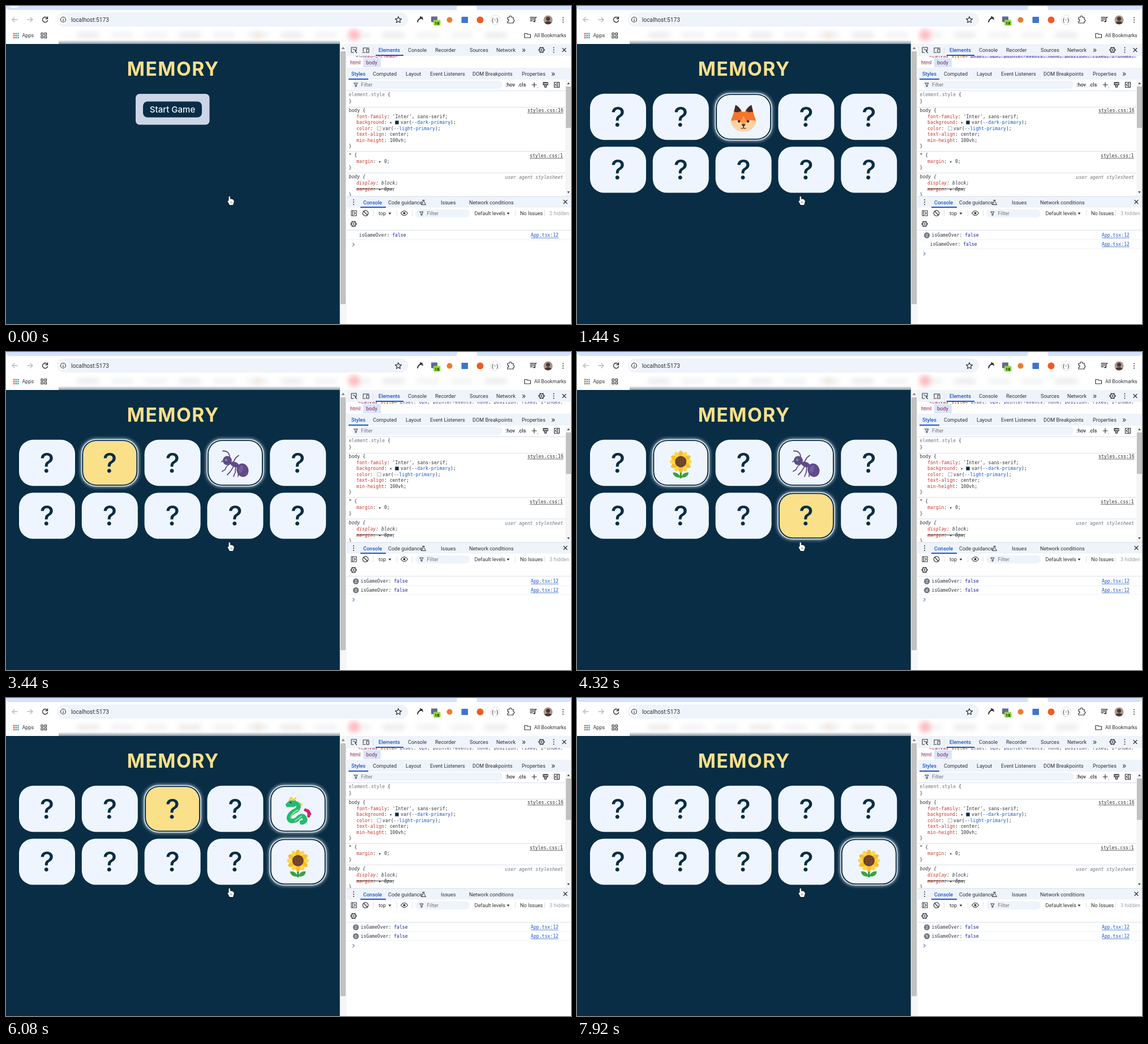
Write an HTML page with a canvas that moves like this. It is 998x561 px and loops after 8 s.

```html
<!DOCTYPE html>
<html lang="en">
<head>
<meta charset="utf-8">
<title>Memory game</title>
<style>
html, body { margin: 0; width: 100%; height: 100%; overflow: hidden; background: #fff; }
canvas { display: block; }
</style>
</head>
<body>
<canvas id="stage" width="998" height="561"></canvas>
<script>
const ctx = document.getElementById('stage').getContext('2d');
const LOOP = 8000, STEP = 80, START = 800;
const NAVY = '#082d45', CARD = '#eff5fe', YELLOW = '#fbe08a', TEAL = '#3fa59f';
const INK = '#303338', GREY = '#70757a', BLUE = '#1b57c8', RED = '#c8352b', LINE = '#d8e0ec', BAR = '#eff3fa';
const UI = '9.1px Roboto, sans-serif', UI_BOLD = '500 9.1px Roboto, sans-serif';
const MONO = '8.15px "DejaVu Sans Mono", monospace';

// [time, card]: cards are numbered 0-9, left to right, top to bottom
const clicks = [[1200, 2], [2000, 6], [2960, 3], [3760, 1], [4720, 9], [5360, 4], [6240, 2], [6800, 1], [7680, 9]];
const hovers = [[1040, 2], [1760, 6], [2640, 7], [2720, 8], [2800, 3], [3360, 1], [4160, 6], [4240, 7], [4320, 8],
  [4400, 9], [5120, 4], [5840, 3], [6000, 2], [6640, 1], [7440, 8], [7520, 9]];
const faces = { 1: sunflower, 2: fox, 3: ant, 4: dragon, 6: dragon, 9: sunflower };

function rect(x, y, w, h, color, radius = 0) {
  ctx.fillStyle = color;
  ctx.beginPath();
  ctx.roundRect(x, y, w, h, radius);
  ctx.fill();
}
function ellipse(x, y, rx, ry, color, angle = 0) {
  ctx.fillStyle = color;
  ctx.beginPath();
  ctx.ellipse(x, y, rx, ry, angle, 0, 7);
  ctx.fill();
}
const dot = (x, y, r, color) => ellipse(x, y, r, r, color);
function fill(d, color) {
  ctx.fillStyle = color;
  ctx.fill(new Path2D(d));
}
function stroke(d, color = INK, width = 1.2) {
  ctx.strokeStyle = color;
  ctx.lineWidth = width;
  ctx.lineCap = ctx.lineJoin = 'round';
  ctx.stroke(new Path2D(d));
}
function at(x, y, draw) {
  ctx.save();
  ctx.translate(x, y);
  draw();
  ctx.restore();
}
function text(str, x, y, color = INK, font = UI) {
  ctx.font = font;
  ctx.fillStyle = color;
  ctx.fillText(str, x, y);
  return x + ctx.measureText(str).width;
}
// alternating strings and colours on one monospaced line
function code(x, y, parts, font = MONO) {
  for (let i = 0; i < parts.length; i += 2) x = text(parts[i], x, y, parts[i + 1], font);
}
const menuDots = (x, y) => [-4, 0, 4].forEach(d => dot(x, y + d, 1, INK));
const cross = (x, y) => stroke(`M${x - 3} ${y - 3}l6 6m0-6l-6 6`);
const funnel = (x, y) => stroke(`M${x - 3} ${y - 3}h6l-2 3v3h-2v-3z`, INK, 1);
const caret = (x, y) => fill(`M${x - 2.5} ${y - 1.5}h5l-2.5 3.5z`, INK);
const ring = (x, y, r, color = INK, w = 1.2) => stroke(`M${x - r} ${y}a${r} ${r} 0 1 0 ${2 * r} 0a${r} ${r} 0 1 0 ${-2 * r} 0`, color, w);
function gear(x, y) {
  ring(x, y, 4, INK, 1.6);
  ring(x, y, 1.3, INK, 1);
  for (let a = 0; a < 6; a++) dot(x + 5 * Math.cos(a * Math.PI / 3), y + 5 * Math.sin(a * Math.PI / 3), .9, INK);
}

function fox() {
  fill('M-18-8L-14-24Q-4-18-3-12H3Q4-18 14-24L18-8L22 3Q18 12 0 16Q-18 12-22 3Z', '#f4752b');
  fill('M-17-12L-14-24Q-7-20-4-13L-10-11ZM17-12L14-24Q7-20 4-13L10-11Z', '#3a2b35');
  fill('M-23 5Q-12 0-5 6L0 11L5 6Q12 0 23 5Q18 23 0 23Q-18 23-23 5Z', '#fdd3a0');
  fill('M-5 5L0-5L5 5L0 12Z', '#ffa04d');
  dot(-8, 5, 2.2, '#33262e');
  dot(8, 5, 2.2, '#33262e');
  fill('M-4 10H4L0 15Z', '#33262e');
  stroke('M-4 17Q-1 19 0 15Q1 19 4 17', '#33262e', 1.1);
}
function dragon() {
  stroke('M13-1Q21 1 19 10M18 1L21 6', '#d51e78', 5);
  stroke('M-12-12L-2-12Q4-8-2-1Q-16 5-16 14Q-13 22-2 16Q6 6 11 12Q16 19 7 21', '#28b971', 8);
  fill('M-22-11L-15-18H-4L0-10L-8-6H-20Z', '#28b971');
  stroke('M0-1Q-12 5-13 13M-5 18Q2 14 6 10', '#8ce58d', 2);
  stroke('M-15-18L-12-23L-8-18L-4-22M4-13L7-10', '#ffc72f', 2.5);
  dot(-13, -14, 1.2, '#173a35');
}
function ant() {
  const c = '#604a89';
  stroke('M-22-24Q-9-24-10-11M-20-7L-24-5M-5-3Q-15 0-18 9L-23 12M-2 2L-9 13L-14 18M1 3L0 14L-3 21M3 2L6 12L5 21M-4-3L1-12L6-16', c, 1.8);
  ellipse(-14, -7, 8, 8, c, .5);
  ellipse(-1, 0, 8, 4.5, c, .35);
  ellipse(13, 10, 10.5, 12, c, -.3);
  ellipse(10, 8, 4, 7, '#735e9d', .3);
  dot(-16, -8, 2.2, '#56a87d');
}
function sunflower() {
  stroke('M0 8V23', '#27973d', 3);
  fill('M0 23Q-4 13-14 14Q-13 24 0 23Q13 24 14 14Q4 13 0 23Z', '#38a341');
  for (let i = 0; i < 12; i++) {
    const a = i * Math.PI / 6;
    ellipse(13 * Math.cos(a), -5 + 13 * Math.sin(a), 6.5, 4, i % 2 ? '#f8bf28' : '#ffd646', a);
  }
  dot(0, -5, 10, '#6d4229');
  for (let i = 0; i < 9; i++) dot(-4 + 4 * (i % 3), -9 + 4 * Math.floor(i / 3), 1, '#8e5a37');
}

const cardX = i => 23 + 110.8 * (i % 5), cardY = i => i < 5 ? 154.8 : 248.2;

function drawCard(i, selected, hovered, scale) {
  at(cardX(i) + 49.5, cardY(i) + 40.7, () => {
    ctx.scale(scale, 1);
    const lit = selected || hovered, color = hovered && !selected ? YELLOW : CARD;
    if (lit) {
      ctx.shadowColor = 'rgba(255,255,255,.9)';
      ctx.shadowBlur = 6;
      rect(-50.5, -41.7, 101, 83.4, '#dce6ef', 26);
      ctx.shadowBlur = 0;
      rect(-49, -40.2, 98, 80.4, NAVY, 25);
      rect(-47, -38.4, 94, 76.8, color, 23);
    } else rect(-49.5, -40.7, 99, 81.4, color, 25);
    if (selected) {
      ctx.translate(0, 3);
      faces[i]();
    } else {
      ctx.textAlign = 'center';
      text('?', 0, 17.5, NAVY, '500 48px Inter, sans-serif');
    }
  });
}

function drawOutlines(alpha) {
  ctx.globalAlpha = alpha;
  ctx.strokeStyle = TEAL;
  ctx.lineWidth = 1;
  ctx.strokeRect(22.5, 154.5, 542.5, 174.5);
  for (let i = 0; i < 10; i++) {
    const x = cardX(i), y = cardY(i), first = i === 0;
    ctx.strokeRect(x, y, 99, 81.4);
    rect(x - .5, y - 10.3, first ? 97 : 48, 10, TEAL);
    text(first ? 'MemoryCard, EmojiButton' : 'EmojiButton', x + 1, y - 3.2, '#0b3c47', '6.8px "DejaVu Sans Mono", monospace');
  }
  ctx.globalAlpha = 1;
}

function drawGame(t) {
  rect(0, 67, 589.5, 494, NAVY);
  ctx.letterSpacing = '1.5px';
  text('MEMORY', 213.7, 123.3, YELLOW, '700 33.5px Inter, sans-serif');
  ctx.letterSpacing = '0px';
  if (t < START) {
    rect(229, 155, 130.5, 54.5, '#ccd5e6', 7);
    rect(242, 168.5, 104, 28, NAVY, 8);
    ctx.textAlign = 'center';
    text('Start Game', 294, 188, '#f3f7fc', '500 15px Inter, sans-serif');
    ctx.textAlign = 'left';
  } else {
    const done = clicks.filter(c => c[0] <= t), n = done.length;
    const picked = done.slice(n - (n % 2 || 2)).map(c => c[1]);
    const last = n ? done[n - 1] : [START, -1];
    const turning = n % 2 && n > 1 ? [last[1], ...done.slice(n - 3, n - 1).map(c => c[1])] : [last[1]];
    const rest = 1 - Math.min(1, (t - last[0] + 72) / 300);
    const turn = Math.abs(Math.cos(Math.PI * (1 - rest * rest)));
    const hover = hovers.filter(h => h[0] <= t).pop();
    for (let i = 0; i < 10; i++)
      drawCard(i, n > 0 && picked.includes(i), hover && hover[1] === i, turning.includes(i) ? turn : 1);
    const fade = 1 - (t - last[0]) / 240;
    if (fade > 0) drawOutlines(fade);
  }
  at(397, 343, () => {
    const hand = 'M-3.5-6.5Q-2-8-1-6.5V-2Q1-3.5 2-1.7Q4-2.5 4.5-.5Q6-.5 5.7 2L4 8H-2L-5.5 1.5Q-5.5 0-3.5 1Z';
    stroke(hand, '#14202b', 1.6);
    fill(hand, '#fff');
    stroke('M-.2 2V5M2 2V5', '#566', .7);
  });
}

function drawBrowser(t) {
  rect(0, 0, 998, 67, '#fff');
  rect(0, 0, 998, 7, '#d3e3fd', [0, 0, 6, 6]);
  rect(796, 0, 36, 8, '#fff', 5);
  if (t < 640) ellipse(14, 0, 9, 3, '#fff');
  stroke('M20 24H11m4-4l-4 4l4 4M38 24h9m-4-4l4 4l-4 4', '#b5b9be', 1.3);
  stroke('M72.5 21A4.6 4.6 0 1 0 73.5 25.5M73.5 19v3.5H70', INK, 1.4);
  rect(90, 11.5, 620, 25, BAR, 12.5);
  dot(101, 24, 8.5, '#fff');
  ring(101, 24, 4.5);
  stroke('M101 23.5v3M101 21.5v.1');
  text('localhost:5173', 115, 28, INK, '10.2px Roboto, sans-serif');
  stroke('M693 18.7l1.6 3.6l3.9.4l-2.9 2.6l.8 3.9l-3.4-2l-3.4 2l.8-3.9l-2.9-2.6l3.9-.4z');
  stroke('M727 28l1-3l4-4m3-1l-2 2m-1-3l4 4', INK, 2);
  rect(751, 18.5, 11, 10, '#646a90', 1);
  rect(755, 24.5, 12.5, 10, '#8edb39', 2);
  text('18', 757, 32.5, '#1c3010', '700 7.5px Roboto, sans-serif');
  dot(783.5, 24.5, 5, '#f07a30');
  rect(804.5, 19, 11.5, 11, '#3e74d2', 1);
  dot(837.5, 24.5, 6, '#f15a22');
  ring(864, 24.5, 8.5, '#d9dde3', 1);
  text('(··)', 858, 27.5, INK, UI_BOLD);
  stroke('M886 20h3q0-2.5 2-2.5t2 2.5h3v3.5q2 .5 2 2t-2 2v2.5h-10v-3q2 0 2-1.8t-2-1.8z');
  stroke('M926 20h7M926 23h7M926 26h4M934.5 27v-7h2.5', INK, 1.3);
  dot(933, 27, 1.6, INK);
  dot(957.5, 24.5, 8, '#a59a91');
  dot(957.5, 22.5, 3.6, '#51352c');
  fill('M951 29.5Q957.5 24 964 29.5Q957.5 35 951 29.5Z', '#51352c');
  menuDots(984, 24.5);
  const colors = ['#e64a3c', '#34a853', '#4285f4'];
  for (let i = 0; i < 9; i++) rect(13 + 3.6 * (i % 3), 47.5 + 3.6 * Math.floor(i / 3), 2.4, 2.4, colors[i % 3]);
  text('Apps', 28.5, 55, INK, '9px Roboto, sans-serif');
  for (let i = 0; i < 4; i++) stroke(`M${62 + 6 * (i % 2)} ${47.5 + 5.5 * (i >> 1)}h3.5v3.5h-3.5z`);
  ctx.save();
  ctx.beginPath();
  ctx.rect(93, 38, 810, 29);
  ctx.clip();
  ctx.filter = 'blur(5px)';
  for (let i = 0; i < 13; i++) rect(125 + i * 60, 47, 40, 9, i % 3 ? '#f0f1f3' : '#e9e9ec', 4);
  dot(445, 51, 6, '#efe5d6');
  dot(615, 51, 10, '#ffb9bd');
  ctx.filter = 'none';
  const shade = ctx.createLinearGradient(0, 60, 0, 67);
  shade.addColorStop(0, 'rgba(8,45,69,0)');
  shade.addColorStop(1, 'rgba(8,45,69,.5)');
  rect(93, 60, 497, 7, shade);
  ctx.restore();
  stroke('M916 48.5h4l1.5 1.5h5v6h-10.5z');
  text('All Bookmarks', 933, 55, INK, '8.8px Roboto, sans-serif');
  rect(589.5, 67, 12.5, 494, '#f6f6f7');
  rect(591, 80, 9, 446, '#c1c1c1');
  fill('M592.5 76h6l-3-4z', '#858585');
}

function drawElementsPanel(t) {
  rect(602, 67, 396, 494, '#fff');
  rect(602, 67, 396, 21, BAR);
  stroke('M614 82h-4v-9h9v4M613 76l6 2.5l-2.5 1l3 3', INK, 1.1);
  stroke('M631 80v-6h10M630 82h5M637 76h4v6h-4z', INK, 1.1);
  rect(648, 73, 1, 11, LINE);
  text('Elements', 658, 81.3, BLUE, UI_BOLD);
  rect(653, 86, 49, 2, BLUE);
  [['Console', 710], ['Recorder', 758], ['Sources', 819], ['Network', 866]].forEach(([s, x]) => text(s, x, 81.3));
  text('»', 911, 81.5, INK, '15px Roboto, sans-serif');
  gear(946, 77.5);
  menuDots(967.5, 77.5);
  cross(986, 77.5);

  ctx.save();
  ctx.beginPath();
  ctx.rect(602, 88, 386, 4);
  ctx.clip();
  if (t < START) code(618, 90.5, ['▸', GREY, '<head>', '#8b2252', '…', INK, '</head>', '#8b2252']);
  else {
    const glow = Math.max(0, Math.min(1, (1680 - t) / 400));
    rect(694, 86, 294, 6, `rgba(155,120,215,${.6 * glow})`);
    code(622, 90.5, ['<canvas ', '#8b2252', 'style', '#994500', '="inset: 0px; pointer-events: none; position: fixed; z-index:', '#3b3b8d']);
  }
  ctx.restore();

  rect(602, 92, 396, 17, '#fff');
  rect(631, 92, 31, 16, '#dae5f8');
  text('html', 608, 103, '#8b2252');
  text('body', 636, 103, '#8b2252');
  rect(602, 109, 396, 21, BAR);
  text('Styles', 610, 123, BLUE, UI_BOLD);
  rect(605, 128, 35, 2, BLUE);
  [['Computed', 648], ['Layout', 706], ['Event Listeners', 749], ['DOM Breakpoints', 824], ['Properties', 911]].forEach(([s, x]) => text(s, x, 123));
  text('»', 963, 123.5, INK, '15px Roboto, sans-serif');
  rect(611, 131.5, 266, 14.5, BAR, 7);
  funnel(618, 139);
  text('Filter', 627, 142.3, GREY);
  text(':hov', 882, 142, INK, UI_BOLD);
  text('.cls', 904, 142, INK, UI_BOLD);
  stroke('M929 139h8m-4-4v8M939 144v.1');
  stroke('M949 135h8v4h-8zM951.5 139v4h3v-4M951 135v2M954 135v2', INK, 1.3);
  stroke('M968.5 134.5h9v9h-9zM974.5 134.5v9M972.5 137l-2 2l2 2');
  [149, 178, 256, 294].forEach(y => rect(602, y, 386, 1, LINE));

  const prop = (y, name, ...rest) => code(619, y, [name, RED, ': ', INK, ...rest]);
  const swatch = (x, y, color) => {
    rect(x, y, 7, 7, '#8a939d');
    rect(x + .7, y + .7, 5.6, 5.6, color);
  };
  code(605.5, 159, ['element.style ', GREY, '{', INK]);
  code(605.5, 171, ['}', INK]);
  code(605.5, 186.5, ['body {', INK]);
  prop(197.7, 'font-family', "'Inter', sans-serif;", INK);
  prop(208.3, 'background', '▸ ', INK);
  swatch(687, 202, NAVY);
  code(697, 208.3, ['var(', INK, '--dark-primary', BLUE, ');', INK]);
  prop(218.8, 'color');
  swatch(655.5, 212.5, '#fff');
  code(665, 218.8, ['var(', INK, '--light-primary', BLUE, ');', INK]);
  prop(229.2, 'text-align', 'center;', INK);
  prop(239.7, 'min-height', '100vh;', INK);
  code(605.5, 250, ['}', INK]);
  code(605.5, 266, ['* {', INK]);
  prop(277.3, 'margin', '▸ 0;', INK);
  code(605.5, 288, ['}', INK]);
  const italic = 'italic ' + MONO;
  code(605.5, 303.5, ['body ', INK, '{', INK], italic);
  code(619, 315, ['display', RED, ': block;', INK], italic);
  code(619, 325.5, ['margin', RED, ': ▸ 8px;', INK], italic);
  rect(619, 322.3, 66, 1, INK);
  code(605.5, 336, ['}', INK]);
  link('styles.css:16', 921, 187, INK);
  link('styles.css:1', 925, 267, INK);
  text('user agent stylesheet', 881.5, 304.5, GREY, italic);
  rect(988, 131, 10, 205, '#f5f5f6');
  rect(989, 142, 9, 73, '#c1c1c1');
  fill('M991 138h5l-2.5-3.5zM991 327h5l-2.5 3.5z', '#555');
}

function link(str, x, y, color) {
  const end = text(str, x, y, color, MONO);
  rect(x, y + 1.4, end - x, .8, color);
}

function logLine(y, count) {
  let x = 623.5;
  if (count > 1) {
    x = 626.5;
    dot(618, y - 2.8, 5.2, '#777b80');
    text(count, 615.7, y, '#fff', '7.5px Roboto, sans-serif');
  }
  code(x, y, ['isGameOver: ', INK, 'false', '#1c1ca8']);
  link('App.tsx:12', 927, y, BLUE);
  rect(602, y + 4.5, 396, 1, '#edf1f7');
}

function drawConsole(t) {
  rect(602, 335.5, 396, 225.5, '#fff');
  rect(602, 335.5, 396, 20, BAR);
  rect(602, 335.5, 396, 1, LINE);
  menuDots(614, 346);
  text('Console', 631, 349.5, BLUE, UI_BOLD);
  rect(626, 354, 45, 2, BLUE);
  text('Code guidance', 675, 349.5);
  stroke('M736 342.5h3M736.5 342.5v3l-3 5h8l-3-5v-3', INK, 1);
  text('Issues', 768, 349.5);
  text('Network conditions', 818, 349.5);
  cross(988, 345.5);
  stroke('M610 361h9v9h-9zM612.5 361v9M615 363.5l2 2l-2 2', INK, 1.1);
  ring(635, 365.5, 4.8);
  stroke('M631.7 362l6.6 7');
  rect(648, 360, 1, 11, LINE);
  text('top', 658, 369);
  caret(678, 366);
  rect(690, 360, 1, 11, LINE);
  stroke('M697.5 365.5Q703.5 357.5 709.5 365.5Q703.5 373.5 697.5 365.5Z');
  dot(703.5, 365.5, 2, INK);
  rect(717, 360, 1, 11, LINE);
  rect(723, 358.5, 96, 14.5, BAR, 7);
  funnel(734, 366);
  text('Filter', 743.5, 369, GREY);
  text('Default levels', 827.5, 369);
  caret(887, 366);
  rect(899, 360, 1, 11, LINE);
  text('No Issues', 908, 369);
  rect(951, 360, 1, 11, LINE);
  text((t < START ? 2 : 3) + ' hidden', 960, 369, '#9aa0a6');
  gear(614, 384.5);
  rect(602, 395, 396, 1, LINE);

  const count = clicks.filter(c => c[0] <= t).length;
  logLine(407.3, t < START ? 1 : 2);
  if (count) logLine(423, count);
  const y = count ? 437 : 421;
  stroke(`M612.5 ${y - 2.7}l2.7 2.7l-2.7 2.7`, '#5c7ba8', 1.1);
}

function frame(now) {
  const t = Math.floor(now % LOOP / STEP) * STEP;
  drawBrowser(t);
  drawGame(t);
  drawElementsPanel(t);
  drawConsole(t);
  requestAnimationFrame(frame);
}
const origin = performance.now();
(function tick() { frame(performance.now() - origin); })();
</script>
</body>
</html>
```
